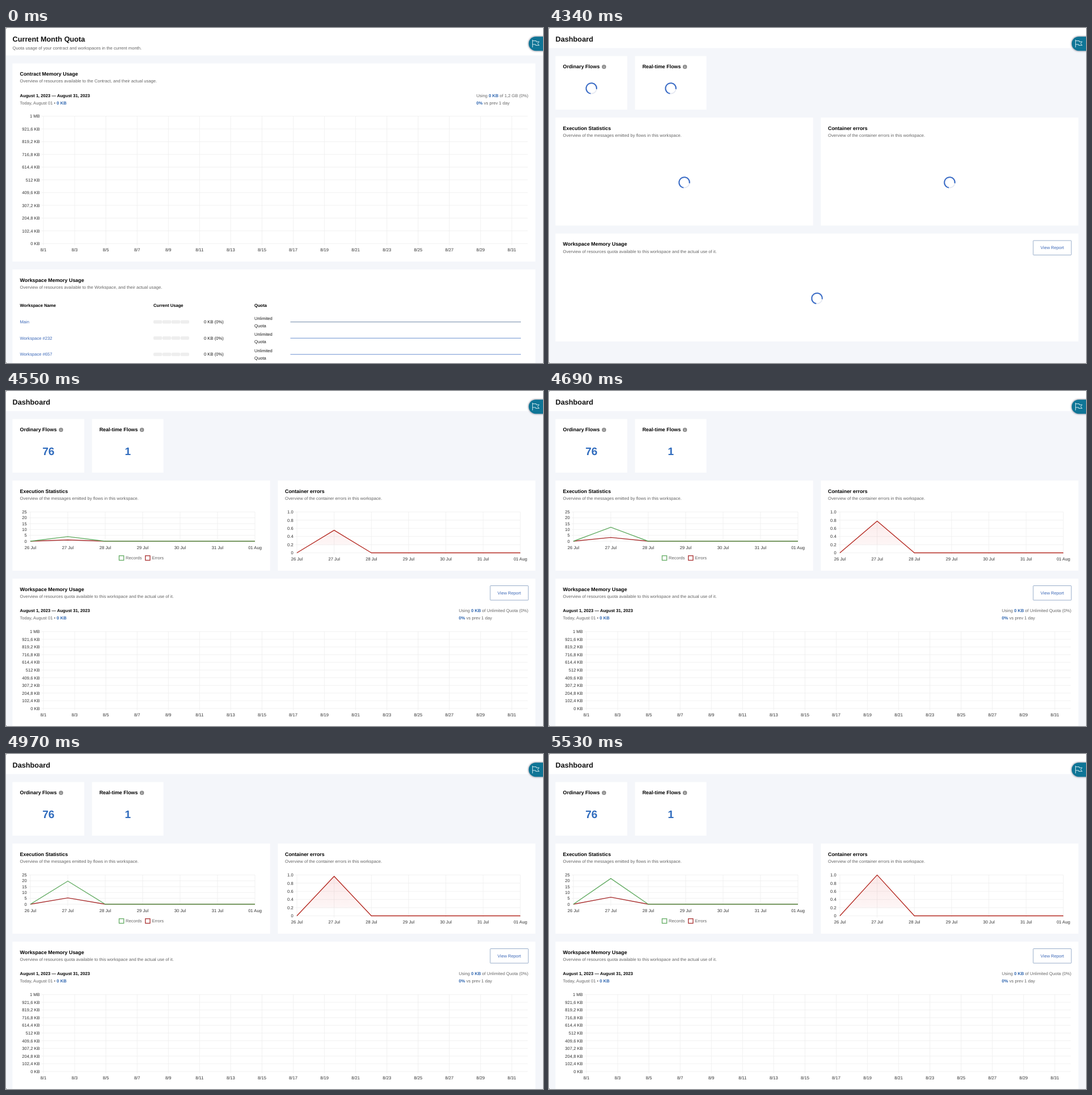
These frames come from a looping animation (947 by 591 pixels, 5670 ms). An HTML page:

```html
<!DOCTYPE html>
<html lang="en">
<head>
<meta charset="utf-8">
<title>Quota dashboard</title>
<style>
  html, body { margin: 0; width: 100%; height: 100%; overflow: hidden; background: #f4f6fa; }
  svg { display: block; width: 947px; height: 591px; }
  text { font: 7.64px "Liberation Sans", Arial, sans-serif; fill: #1c1c1c; text-rendering: geometricPrecision; white-space: pre; }
  .title { font-size: 12.73px; font-weight: bold; fill: #111; }
  .head { font-size: 8.91px; font-weight: bold; fill: #000; }
  .big { font-size: 19.1px; font-weight: bold; fill: #2f6bbd; }
  .bold { font-weight: bold; fill: #000; }
  .sub { fill: #666; }
  .link { fill: #3d69b8; }
  .key { font-weight: bold; fill: #2f66b0; }
  .tick { fill: #333; }
  .end { text-anchor: end; }
  .mid { text-anchor: middle; }
  .grid { stroke: #eee; stroke-width: .8; fill: none; }
  .line { fill: none; stroke-width: 1.35; stroke-linejoin: round; }
</style>
</head>
<body>
<svg id="stage" viewBox="0 0 947 591">
  <defs>
    <linearGradient id="blush" gradientUnits="userSpaceOnUse" x1="0" y1="213" x2="0" y2="273">
      <stop offset="0" stop-color="#e03c3c" stop-opacity=".12"/>
      <stop offset=".94" stop-color="#e03c3c" stop-opacity=".05"/>
      <stop offset="1" stop-color="#e03c3c" stop-opacity="0"/>
    </linearGradient>
    <filter id="soft" x="-40%" y="-40%" width="180%" height="180%">
      <feGaussianBlur stdDeviation="1.3"/>
    </filter>
  </defs>
</svg>
<script>
const LOOP = 5670, STEP = 70, SWITCH = 4130, COUNTS_AT = 4410, CHARTS_AT = 4480;
const GREEN = '#62ab62', RED = '#a92f2f', CRIMSON = '#b3261e';
const SIZES = { title: 12.73, head: 8.91, big: 19.1 };
const stage = document.getElementById('stage');

function add(parent, tag, attrs = {}) {
  const el = document.createElementNS('http://www.w3.org/2000/svg', tag);
  for (const k in attrs) el.setAttribute(k, attrs[k]);
  parent.appendChild(el);
  return el;
}
const group = parent => add(parent, 'g');
const show = (el, on) => el.setAttribute('display', on ? 'inline' : 'none');

function rect(parent, x1, y1, x2, y2, fill = '#fff', extra = {}) {
  return add(parent, 'rect', { x: x1, y: y1, width: x2 - x1, height: y2 - y1, fill, ...extra });
}

// y is the middle of the capitals; parts between asterisks are emphasised
function text(parent, x, y, str, cls = '') {
  const size = SIZES[cls.split(' ')[0]] || 7.64;
  const el = add(parent, 'text', { x, y: y + size * 0.355, class: cls });
  str.split('*').forEach((part, i) => {
    if (part) add(el, 'tspan', i % 2 ? { class: 'key' } : {}).textContent = part;
  });
  return el;
}

function heading(parent, x, y, title, sub) {
  text(parent, x, y, title, 'head');
  text(parent, x, y + 13, sub, 'sub');
}

function chartGrid(parent, c) {
  const h = (c.y2 - c.y1) / (c.yLabels.length - 1);
  const w = (c.x2 - c.x1) / (c.xLabels.length - 1);
  const right = c.right || c.x2;
  let d = '';
  c.yLabels.forEach((label, i) => {
    const y = c.y1 + i * h;
    d += `M${c.x1 - 3} ${y}H${right}`;
    text(parent, c.x1 - 6.3, y, label, 'tick end');
  });
  c.xLabels.forEach((label, i) => {
    const x = c.x1 + i * w;
    d += `M${x} ${c.y1}V${c.y2 + 3}`;
    text(parent, x, c.y2 + 11, label, 'tick mid');
  });
  add(parent, 'path', { d, class: 'grid' });
}

const memoryGrid = (y1, y2) => ({
  x1: 66, x2: 892, right: 920, y1, y2,
  yLabels: ['1 MB', '921,6 KB', '819,2 KB', '716,8 KB', '614,4 KB', '512 KB',
    '409,6 KB', '307,2 KB', '204,8 KB', '102,4 KB', '0 KB'],
  xLabels: Array.from({ length: 16 }, (_, i) => `8/${2 * i + 1}`)
});
const days = ['26 Jul', '27 Jul', '28 Jul', '29 Jul', '30 Jul', '31 Jul', '01 Aug'];

function memorySummary(parent, y, x, using) {
  text(parent, 24.5, y, 'August 1, 2023 — August 31, 2023', 'bold');
  text(parent, 24.5, y + 12.8, 'Today, August 01 • *0 KB*', 'sub');
  text(parent, x, y, using, 'sub');
  text(parent, x, y + 13.2, '*0%* vs prev 1 day', 'sub');
}

const spinners = [];
function spinner(parent, x, y) {
  const g = group(parent);
  add(g, 'circle', { cx: x, cy: y, r: 9.3, fill: 'none', stroke: '#e6e9f2', 'stroke-width': 1.9 });
  const arc = add(g, 'circle', {
    cx: x, cy: y, r: 9.3, fill: 'none', stroke: '#3a6cc6', 'stroke-width': 2.1,
    pathLength: 360, 'stroke-dasharray': '270 90'
  });
  spinners.push({ arc, x, y });
  return g;
}

rect(stage, 0, 0, 947, 591, '#f4f6fa');

// Quota page
const quota = group(stage);
rect(quota, 0, 0, 947, 48.5);
text(quota, 11.5, 19.5, 'Current Month Quota', 'title');
text(quota, 11.5, 35.5, 'Quota usage of your contract and workspaces in the current month.', 'sub');
rect(quota, 11.5, 62.5, 933.5, 412);
heading(quota, 24.5, 80.6, 'Contract Memory Usage', 'Overview of resources available to the Contract, and their actual usage.');
memorySummary(quota, 119, 829.5, 'Using *0 KB* of 1,2 GB (0%)');
chartGrid(quota, memoryGrid(155.6, 380.3));
rect(quota, 11.5, 426, 933.5, 600);
heading(quota, 24.5, 444.4, 'Workspace Memory Usage', 'Overview of resources available to the Workspace, and their actual usage.');
[[24.5, 'Workspace Name'], [260, 'Current Usage'], [438, 'Quota']]
  .forEach(([x, label]) => text(quota, x, 489.5, label, 'bold'));
['Main', 'Workspace #232', 'Workspace #657'].forEach((name, i) => {
  const y = 518.5 + i * 28.6;
  text(quota, 24.5, y, name, 'link');
  for (let s = 0; s < 4; s++) {
    rect(quota, 260 + s * 15.9, y - 3, 275.4 + s * 15.9, y + 3, '#eee', { rx: 2 });
  }
  text(quota, 349, y, '0 KB (0%)');
  text(quota, 438, y - 6.7, 'Unlimited');
  text(quota, 438, y + 6.3, 'Quota');
  rect(quota, 501.5, y - 0.4, 908, y + 0.6, i ? '#6a90cf' : '#7088a8');
});

// Dashboard page
const dash = group(stage);
rect(dash, 0, 0, 947, 35.5);
text(dash, 11.5, 19.5, 'Dashboard', 'title');

const loadingCounts = group(dash), counts = group(dash);
function counter(x1, x2, label, iconX, value) {
  const mid = (x1 + x2) / 2;
  const card = rect(dash, x1, 49.5, x2, 144);
  dash.insertBefore(card, loadingCounts);
  text(dash, x1 + 13, 68, label, 'head');
  add(dash, 'circle', { cx: iconX, cy: 68.5, r: 3.7, fill: '#8b8b8b' });
  rect(dash, iconX - 0.45, 67.9, iconX + 0.45, 70.6);
  rect(dash, iconX - 0.45, 66.3, iconX + 0.45, 67.2);
  spinner(loadingCounts, mid, 106.5);
  text(counts, mid, 106, value, 'big mid');
}
counter(11.5, 138, 'Ordinary Flows', 97, '76');
counter(151.7, 277.7, 'Real-time Flows', 239.7, '1');

const rowCards = [rect(dash, 11.5, 158, 465.7, 348.5), rect(dash, 479.5, 158, 933.5, 348.5)];
heading(dash, 24.5, 176.7, 'Execution Statistics', 'Overview of the messages emitted by flows in this workspace.');
heading(dash, 492, 176.7, 'Container errors', 'Overview of the container errors in this workspace.');
const statsWait = spinner(dash, 238.6, 272.5);
const errorsWait = spinner(dash, 706.5, 272.5);

const stats = group(dash);
const statsBox = { x1: 43, x2: 439, y1: 213.4, y2: 265, yLabels: ['25', '20', '15', '10', '5', '0'], xLabels: days };
chartGrid(stats, statsBox);
const failLine = add(stats, 'path', { class: 'line', stroke: RED });
const recordLine = add(stats, 'path', { class: 'line', stroke: GREEN });
[[199.5, 'Records', GREEN], [245.8, 'Errors', RED]].forEach(([x, label, stroke]) => {
  rect(stats, x, 290.6, x + 8.2, 298.6, '#fff', { stroke, 'stroke-width': 1.3 });
  text(stats, x + 11.6, 294.5, label, 'sub');
});

const errors = group(dash);
const errorsBox = { x1: 513, x2: 907, y1: 213.4, y2: 285.5, yLabels: ['1.0', '0.8', '0.6', '0.4', '0.2', '0'], xLabels: days };
chartGrid(errors, errorsBox);
const errorFill = add(errors, 'path', { fill: 'url(#blush)' });
const errorLine = add(errors, 'path', { class: 'line', stroke: CRIMSON });

const memory = group(dash);
const memoryCard = rect(memory, 11.5, 362.5, 933.5, 553);
const memoryBody = group(memory);
heading(memoryBody, 24.5, 381, 'Workspace Memory Usage', 'Overview of resources quota available to this workspace and the actual use of it.');
rect(memoryBody, 853.9, 375, 921.1, 400.5, '#fff', { stroke: '#98adc9', 'stroke-width': 1, rx: 0.6 });
text(memoryBody, 887.5, 387.6, 'View Report', 'link mid');
const memoryWait = spinner(memoryBody, 472.6, 477);
const memoryChart = group(memory);
memorySummary(memoryChart, 419, 798.5, 'Using *0 KB* of Unlimited Quota (0%)');
chartGrid(memoryChart, memoryGrid(455.9, 591.6));

// Side button and window corners
rect(stage, 920.5, 14, 960, 41.5, '#778', { rx: 13.5, opacity: 0.55, filter: 'url(#soft)' });
rect(stage, 921.8, 15.2, 960, 40.2, '#0f7596', { rx: 12.5 });
add(stage, 'path', {
  d: 'M928.6 20.8V34.2M928.6 22.6H935V24.2H940.2L937.6 27.4L940.2 30.6H934V29H928.6',
  fill: 'none', stroke: '#e4f3f7', 'stroke-width': 0.9, 'stroke-linejoin': 'round'
});
rect(stage, 0, 0, 1, 1, '#777');
rect(stage, 0, 590, 1, 591, '#777');

const easeOut = (t, start, length) => {
  const p = Math.min(1, Math.max(0, (t - start) / length));
  return 1 - (1 - p) ** 4;
};

// Single peak on the second day, level elsewhere
function peak(box, share) {
  const w = (box.x2 - box.x1) / 6;
  const top = box.y2 - (box.y2 - box.y1) * share;
  return `M${box.x1} ${box.y2}L${box.x1 + w} ${top}L${box.x1 + 2 * w} ${box.y2}`;
}

function render(now) {
  const t = Math.floor((now % LOOP) / STEP) * STEP;
  const onDash = t >= SWITCH, counted = t >= COUNTS_AT, charted = t >= CHARTS_AT;
  show(quota, !onDash);
  show(dash, onDash);
  if (!onDash) return;

  show(loadingCounts, !counted);
  show(counts, counted);
  show(errorsWait, !counted);
  show(errors, counted);
  show(statsWait, !charted);
  show(stats, charted);
  show(memoryWait, !charted);
  show(memoryChart, charted);

  rowCards.forEach(c => c.setAttribute('height', charted ? 159 : 190.5));
  memory.setAttribute('transform', `translate(0 ${charted ? -31.5 : 0})`);
  memoryCard.setAttribute('height', charted ? 270 : 190.5);

  const fade = Math.min(1, (t - SWITCH) / 210);
  const mix = (a, b) => Math.round(a + (b - a) * fade);
  memoryCard.setAttribute('fill', `rgb(${mix(246, 255)},${mix(252, 255)},${mix(252, 255)})`);
  memoryBody.setAttribute('opacity', 0.22 + 0.78 * fade * (1.4 - 0.4 * fade));

  const turn = 23 + (t - SWITCH) * 0.36;
  spinners.forEach(s => s.arc.setAttribute('transform', `rotate(${turn} ${s.x} ${s.y})`));

  const grow = easeOut(t, 4498, 1085);
  recordLine.setAttribute('d', peak(statsBox, grow * 22 / 25) + `H${statsBox.x2}`);
  failLine.setAttribute('d', peak(statsBox, grow * 6 / 25) + `H${statsBox.x2}`);
  const hill = peak(errorsBox, easeOut(t, 4354, 1076));
  errorFill.setAttribute('d', hill + 'Z');
  errorLine.setAttribute('d', hill + `H${errorsBox.x2}`);
}

function loop() {
  render(performance.now());
  requestAnimationFrame(loop);
}
loop();
</script>
</body>
</html>
```
